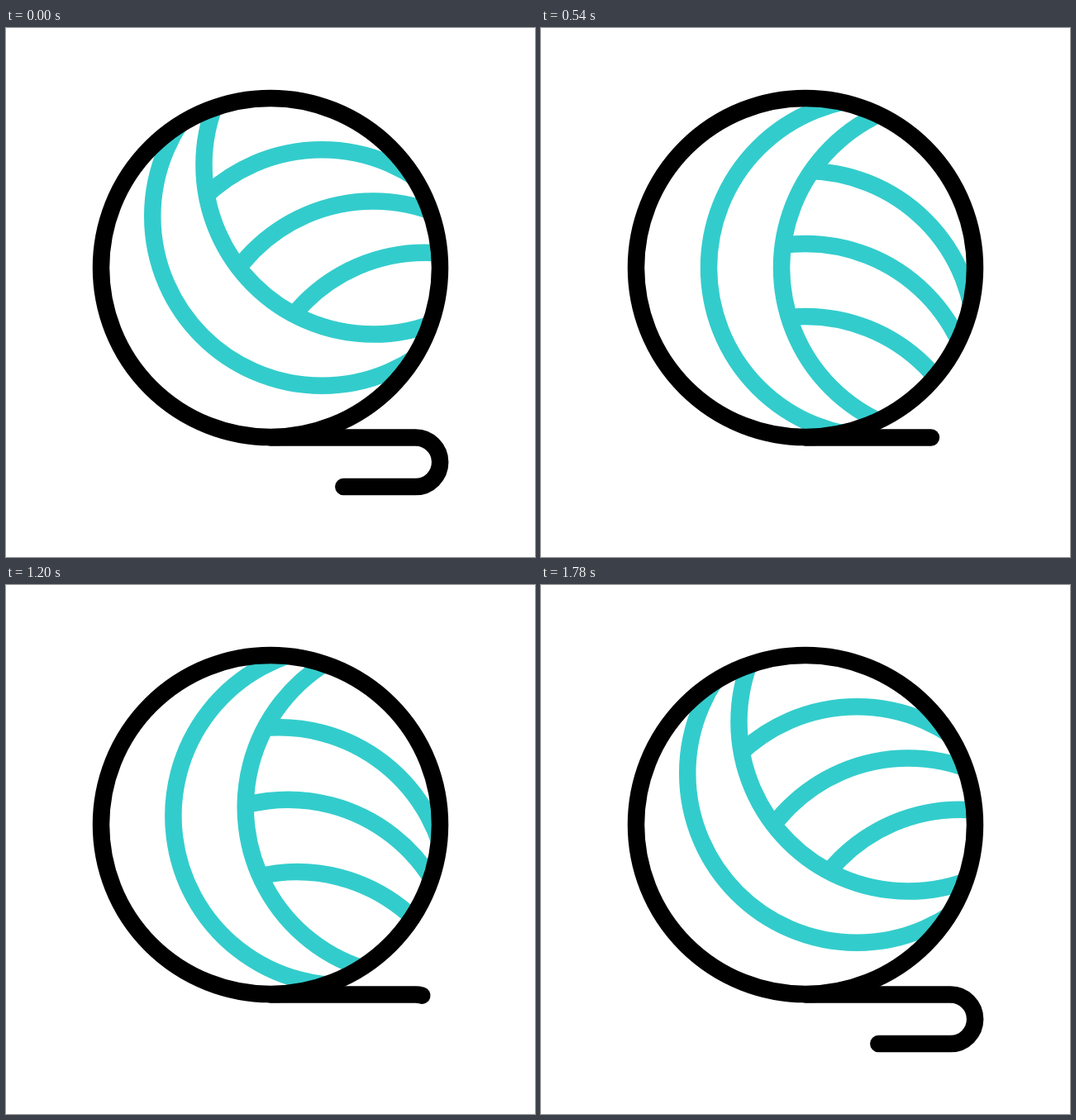
An HTML page with a canvas for the animation above (2.4 s loop, 640 by 640 pixels).

```html
<!DOCTYPE html>
<html lang="en">
<head>
<meta charset="utf-8">
<title>Yarn ball</title>
<style>
  html, body { margin: 0; width: 100%; height: 100%; overflow: hidden; background: #fff; }
  canvas { display: block; width: 640px; height: 640px; }
</style>
</head>
<body>
<canvas id="stage"></canvas>
<script>
const canvas = document.getElementById('stage');
const ctx = canvas.getContext('2d');
const dpr = window.devicePixelRatio || 1;
canvas.width = canvas.height = 640 * dpr;

const LOOP = 2400, TURN = 803, END = 1775;
const CX = 320, CY = 290, R = 205, GAP = 88, LINE = 20.5;
const TEAL = '#33cccc';
const MAX_ANGLE = Math.PI / 3, MAX_PULL = 272;

// Loose thread: straight run, half-turn, short run back
const TAIL_Y = 495.6, BEND_X = 495.4, BEND_R = 29.75, TIP_X = 408.3;
const TAIL_LENGTH = (BEND_X - CX) + Math.PI * BEND_R + (BEND_X - TIP_X);

function smooth(s) {
  s = Math.min(1, Math.max(0, s));
  return s * s * (3 - 2 * s);
}

// 0 = thread fully out, 1 = wound in
function windAt(t) {
  return t < TURN ? smooth(t / TURN) : 1 - smooth((t - TURN) / (END - TURN));
}

function circle(x, y) {
  ctx.beginPath();
  ctx.arc(x, y, R, 0, Math.PI * 2);
}

function ring(x, y, color) {
  circle(x, y);
  ctx.strokeStyle = color;
  ctx.stroke();
}

function drawStrands(angle) {
  ctx.save();
  circle(CX, CY);
  ctx.clip();
  ctx.translate(CX, CY);
  ctx.rotate(angle);

  ctx.save();
  circle(2 * GAP, 0);
  ctx.clip();
  for (let i = 1; i <= 3; i++) ring((i - 1) * 0, i * GAP, TEAL);
  ctx.restore();

  ring(GAP, 0, TEAL);
  ring(2 * GAP, 0, TEAL);
  ctx.restore();
}

function drawTail(length) {
  ctx.save();
  ctx.lineCap = 'round';
  ctx.setLineDash([length, 2000]);
  ctx.beginPath();
  ctx.moveTo(CX, TAIL_Y);
  ctx.lineTo(BEND_X, TAIL_Y);
  ctx.arc(BEND_X, TAIL_Y + BEND_R, BEND_R, -Math.PI / 2, Math.PI / 2);
  ctx.lineTo(TIP_X, TAIL_Y + 2 * BEND_R);
  ctx.strokeStyle = '#000';
  ctx.stroke();
  ctx.restore();
}

function draw(t) {
  const wind = windAt(t);
  ctx.setTransform(dpr, 0, 0, dpr, 0, 0);
  ctx.fillStyle = '#fff';
  ctx.fillRect(0, 0, 640, 640);
  ctx.lineWidth = LINE;
  drawStrands(wind * MAX_ANGLE - Math.PI / 4);
  ring(CX, CY, '#000');
  drawTail(TAIL_LENGTH - wind * MAX_PULL);
}

const start = performance.now();
function tick() {
  draw((performance.now() - start) % LOOP);
  requestAnimationFrame(tick);
}
tick();
</script>
</body>
</html>
```
